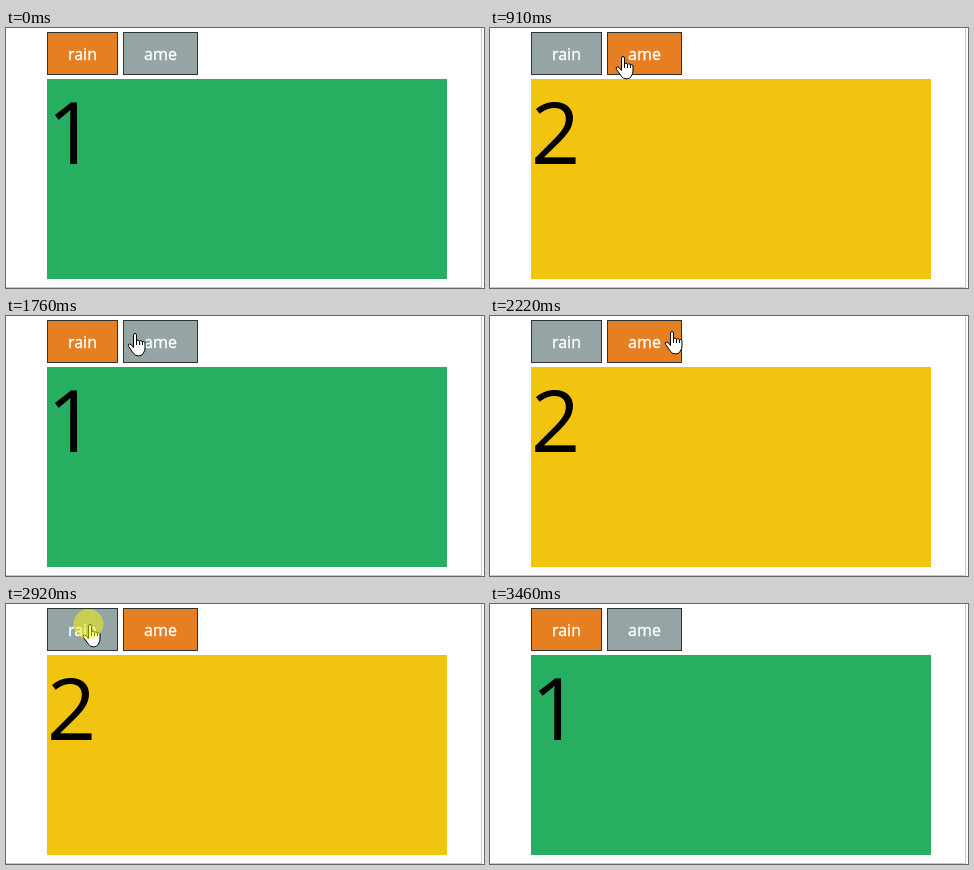
These frames come from a looping animation (478 px wide and 260 px high, 3770 ms). An HTML page:

```html
<!DOCTYPE html>
<html lang="en">
<head>
<meta charset="utf-8">
<title>Tabs</title>
<style>
  html, body { margin: 0; width: 100%; height: 100%; overflow: hidden; background: #fff; }
  svg { display: block; width: 478px; height: 260px; }
  text { font-family: "Open Sans", "Noto Sans", sans-serif; }
  .tab { stroke: #2f3333; }
  .label { font-size: 16px; fill: #fff; stroke: #fff; stroke-width: .35; text-anchor: middle; }
  .cursor { fill: #fff; stroke: #000; stroke-linejoin: round; }
</style>
</head>
<body>
<svg viewBox="0 0 478 260">
  <path d="M475.5 0V259.5H0" fill="none" stroke="#c8c8c8"/>
  <rect id="rain" class="tab" x="41.5" y="4.5" width="70" height="42"/>
  <rect id="ame" class="tab" x="117.5" y="4.5" width="74" height="42"/>
  <text class="label" x="76.5" y="32">rain</text>
  <text class="label" x="154.5" y="32">ame</text>
  <rect id="pane" x="41" y="51" width="400" height="200"/>
  <text id="digit" x="41" y="136.4" font-size="86">1</text>
  <g id="pointer" class="cursor">
    <path id="hand" d="M6.5 14.5V2a1.5 1.5 0 0 1 3 0V8c.4-1.2 2.6-1.2 3 .4c.5-1 2.5-.8 2.9 .6c.6-.9 2.6-.4 2.6 1V15q0 3-1.6 5q-1.2 2.9-4.6 2.9q-4 0-5.6-2.9L1.6 13.5q-1.2-2 .6-2.6q1.8-.3 4.3 3.6M9.5 8v4M12.5 8.4V12M15.4 9v3"/>
    <path id="arrow" d="M.5.8V16.8l3.7-3.5 2.4 5.2 2.2-1-2.3-5.1h5z"/>
  </g>
  <circle id="press" r="15" fill="#f8f800" fill-opacity=".5"/>
</svg>
<script>
const LOOP = 3770, TICK = 76.94, LEAD = 14;
const ORANGE = "#e67e22", GRAY = "#95a5a6", GREEN = "#27ae60", YELLOW = "#f1c40f";

const point = (x, y) => ({ x, y });
const linear = k => k;
const easeOut = power => k => 1 - (1 - k) ** power;
const easeInOut = k => k * k * (3 - 2 * k);

const entry = point(99, 231), exit = point(123, 231);
const ameLow = point(157, 34), ameHigh = point(162, 15);
const rainFirst = point(80, 19), rainLast = point(76, 20);

// Each leg curves towards its bend; the pointer rests between legs
const leg = (start, end, from, to, ease, bend = point((from.x + to.x) / 2, (from.y + to.y) / 2)) =>
  ({ start, end, from, to, ease, bend });
const legs = [
  leg(1, 8, entry, ameLow, easeOut(2), point(230, 90)),
  leg(11, 17, ameLow, rainFirst, easeOut(3)),
  leg(21, 25, rainFirst, ameHigh, easeInOut),
  leg(28, 36, ameHigh, rainLast, linear, point(222, 15)),
  leg(39, 44, rainLast, exit, linear)
];
const lastTick = legs[legs.length - 1].end;

const el = id => document.getElementById(id);
const show = (id, on) => el(id).setAttribute("visibility", on ? "visible" : "hidden");
const fill = (id, color) => el(id).setAttribute("fill", color);
const move = (id, x, y) => el(id).setAttribute("transform", `translate(${x} ${y})`);

function pointerAt(tick, { start, end, from, to, ease, bend }) {
  const k = ease(Math.min(1, (tick - start) / (end - start)));
  const curve = axis => Math.round(
    (1 - k) ** 2 * from[axis] + 2 * k * (1 - k) * bend[axis] + k * k * to[axis]);
  return point(curve("x"), curve("y"));
}

function draw(ms) {
  const tick = Math.floor((ms + LEAD) / TICK);
  const started = legs.filter(l => l.start <= tick).length;
  const visible = started > 0 && tick <= lastTick;

  // Every press ends as the pointer sets off again, switching the tab
  const first = started < 2 || started % 2 === 1;
  const pressing = started > 0 && started < legs.length && tick === legs[started].start - 1;

  fill("rain", first ? ORANGE : GRAY);
  fill("ame", first ? GRAY : ORANGE);
  fill("pane", first ? GREEN : YELLOW);
  el("digit").textContent = first ? "1" : "2";

  const { x, y } = pointerAt(tick, legs[Math.max(0, started - 1)]);
  const overTab = y < 47;
  move("pointer", x, y);
  show("hand", visible && overTab);
  show("arrow", visible && !overTab);
  move("press", x + 6.5, y);
  show("press", pressing);
}

const start = performance.now();
function loop() {
  draw((performance.now() - start) % LOOP);
  requestAnimationFrame(loop);
}
loop();
</script>
</body>
</html>
```
